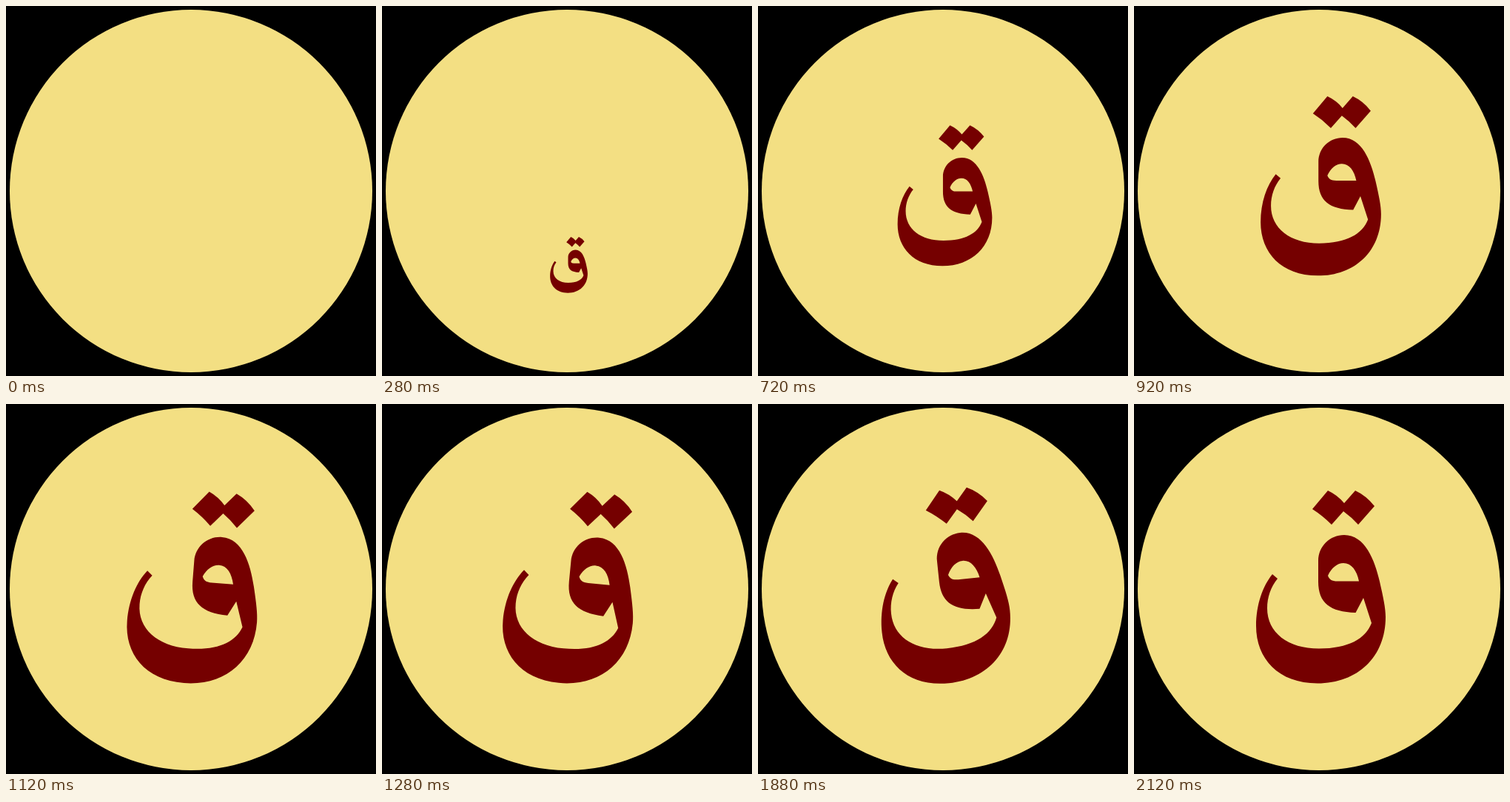
Recreate the animation shown at these times as an HTML page. Size 500x500 px, loop 2.8 s.

```html
<!DOCTYPE html>
<html lang="ar">
<head>
<meta charset="utf-8">
<title>ق</title>
<style>
  html, body { margin: 0; width: 100%; height: 100%; overflow: hidden; background: #000; }
  svg { display: block; width: 100vw; height: 100vh; }
</style>
</head>
<body>
<svg viewBox="0 0 500 500" role="img" aria-label="ق">
  <circle cx="250" cy="250" r="245" fill="#f3df83"/>
  <g id="letter" fill="#750000" fill-rule="evenodd" visibility="hidden">
    <path d="M241 142L262 117Q275 123 284 134L299 117Q314 124 325 138L303 163Q294 153 283 145L267 163Q255 151 241 142Z"/>
    <path d="M249 240V212C249 192 265 177 284 177C312 177 325 210 332 240C337 262 340 276 340 288
      C340 342 302 377.5 248 377.5C195 377.5 165 344 165 300C165 271 174 246 187 230L194 236
      C185 247 180 261 180 276C180 309 208 330.5 250 330.5C290 330.5 313 317 321 296L310 262L299.500 282
      C265 281 249 269 249 240Z
      M262 232C267 221 275 215 283 215C294 215 301 225 304 239.500H275C267 239.500 264 237 262 232Z"/>
  </g>
</svg>
<script>
  const LOOP = 2800, STEP = 40;
  const letter = document.getElementById('letter');
  const clamp = x => Math.min(1, Math.max(0, x));
  const progress = (t, from, to) => clamp((t - from) / (to - from));

  // Eased swing out and back between two times
  const swing = (t, from, to, angle) =>
    angle * Math.max(0, Math.sin(Math.PI * progress(t, from, to))) ** 1.5;

  function pose(t) {
    const rise = (1 + Math.cos(Math.PI * progress(t, 0, 900))) / 2;
    return {
      scale: clamp((t + 10) / 1000),
      y: 243 + 137 * rise + 4 * progress(t, 920, 1000),
      angle: swing(t, 960, 1480, 6) + swing(t, 1600, 2120, -6)
    };
  }

  function draw(t) {
    const { scale, y, angle } = pose(t);
    letter.setAttribute('visibility', t > 0 ? 'visible' : 'hidden');
    letter.setAttribute('transform',
      `translate(252.5 ${y}) scale(${scale}) translate(-252.5 -247) rotate(${angle} 250 280)`);
  }

  const start = performance.now();
  function tick() {
    const t = (performance.now() - start) % LOOP;
    draw(Math.floor(t / STEP) * STEP);
    requestAnimationFrame(tick);
  }
  tick();
</script>
</body>
</html>
```
